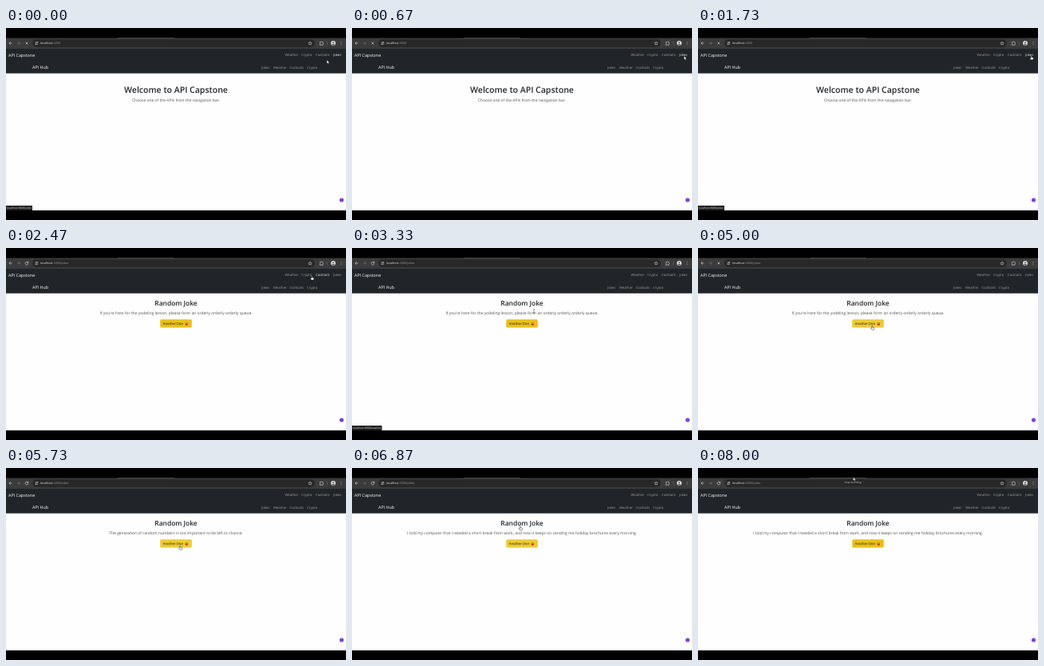
An HTML page that plays this animation: 426x240 px, repeating every 8070 ms.

```html
<!DOCTYPE html>
<html lang="en">
<head>
<meta charset="utf-8">
<title>API Capstone</title>
<style>
  html, body { margin: 0; width: 100%; height: 100%; overflow: hidden; background: #000; }
  svg { display: block; width: 100vw; height: 100vh; }
  text { font-family: "Open Sans", "Noto Sans", sans-serif; text-rendering: geometricPrecision; white-space: pre; }
  .brand { font-size: 5.37px; fill: #fff; }
  .link { font-size: 4.25px; fill: #9b9d9f; }
  .mid { text-anchor: middle; fill: #212529; }
  .lead { font-size: 4.95px; fill: #4c5054; }
  .title { font-weight: 600; }
  .icon { fill: none; stroke: #d5d5d5; stroke-width: .65; }
</style>
</head>
<body>
<svg viewBox="0 0 426 240" preserveAspectRatio="none">
  <rect width="426" height="240"/>
  <rect y="12.5" width="426" height="13.5" fill="#3b3b3b"/>
  <path d="M140 12.5H210.5" stroke="#666" stroke-width=".5"/>
  <rect x="33" y="14.3" width="354" height="9.6" rx="4.8" fill="#282828"/>

  <!-- toolbar -->
  <g class="icon">
    <path d="M7.5 19H4M5.6 17.3L3.9 19L5.6 20.7"/>
    <path d="M14 19H17.5M15.9 17.3L17.6 19L15.9 20.7" stroke="#777"/>
    <path id="stop" d="M24.6 17.6L27.4 20.4M27.4 17.6L24.6 20.4"/>
    <path id="reload" d="M27.7 18.2A1.9 1.9 0 1 0 27.9 19.5M27.9 16.8V18.5H26.2"/>
    <path d="M36.5 18H38.4M39 20.2H40.2M36.5 20.2H37.4M39.6 18H40.2"/>
    <circle cx="39" cy="18" r=".6"/><circle cx="37.8" cy="20.2" r=".6"/>
    <path d="M381 16.9L381.6 18.4L383.2 18.5L382 19.5L382.4 21L381 20.2L379.6 21L380 19.5L378.8 18.5L380.4 18.4Z" stroke-width=".5"/>
    <path d="M393.3 17.5H394.6A.8.8 0 0 1 396.1 17.5H397V18.6A.8.8 0 0 1 397 20.1V21.2H393.3V20A.8.8 0 0 0 393.3 18.6Z"/>
    <path d="M402.5 16.8V21.2" stroke="#666"/>
  </g>
  <circle cx="410" cy="19" r="2.9" fill="#e4e4e4"/>
  <circle cx="410" cy="18.2" r="1" fill="#555"/>
  <path d="M408 20.9Q410 18.7 412 20.9Q410 22.2 408 20.9" fill="#555"/>
  <g fill="#d5d5d5"><circle cx="420" cy="17.3" r=".45"/><circle cx="420" cy="19" r=".45"/><circle cx="420" cy="20.7" r=".45"/></g>
  <text x="43" y="20.3" font-size="3.72" fill="#e6e6e6">localhost<tspan id="path" fill="#9a9a9a"></tspan></text>

  <!-- page -->
  <rect y="26" width="426" height="31" fill="#212529"/>
  <rect y="56.7" width="426" height="171.3" fill="#fefefe"/>
  <text class="brand" x="3" y="35.7">API Capstone</text>
  <text class="brand" x="33" y="51.2">API Hub</text>
  <g id="links"></g>

  <g id="home">
    <text class="mid title" x="213" y="81" font-size="10.54">Welcome to API Capstone</text>
    <text class="mid lead" x="213" y="92">Choose one of the APIs from the navigation bar.</text>
  </g>
  <g id="jokes">
    <text class="mid title" x="213" y="72.3" font-size="8.43">Random Joke</text>
    <text class="mid lead" id="joke" x="213" y="82.6"></text>
    <rect id="button" x="193.2" y="89.2" width="39.6" height="10.4" rx="1.5"/>
    <text x="196.8" y="96" font-size="4.17" fill="#111">Another One</text>
    <circle cx="226.2" cy="94.7" r="2.2" fill="#f2b322"/>
    <path d="M224.6 94.7H227.9Q227.8 96.7 226.2 96.7Q224.7 96.7 224.6 94.7" fill="#c8202c"/>
    <path d="M224.7 93.8L225.8 94.1M226.7 94.1L227.8 93.8" stroke="#5a2512" stroke-width=".6"/>
  </g>

  <circle cx="420.5" cy="215" r="2.6" fill="#7d43d3"/>
  <g id="status">
    <rect id="statusBox" y="222" height="6" fill="#1f1f1f"/>
    <text id="statusText" x="1" y="226.1" font-size="3.25" fill="#e8e8e8"></text>
  </g>
  <g id="tooltip">
    <rect x="180" y="13.8" width="27.6" height="8.8" rx=".8" fill="#252525" stroke="#444" stroke-width=".3"/>
    <text x="193.8" y="19.3" font-size="3.2" fill="#d8d8d8" text-anchor="middle">Stop recording</text>
  </g>

  <g id="cursor" stroke-linejoin="round">
    <path id="arrow" d="M0 0V4.6L1.1 3.6L1.9 5.3L2.7 4.9L1.9 3.3H3.3Z" fill="#fff" stroke="#111" stroke-width=".4"/>
    <path id="hand" d="M-.5 .4Q0-.3 .5 .4V2.1L2.3 2.5Q2.8 2.7 2.6 3.5L2.1 5.2H-.5L-1.8 3.4Q-1.8 2.6-.5 3.1Z" fill="#fff" stroke="#111" stroke-width=".45"/>
    <path id="beam" d="M-.9-2.3H.9M0-2.3V2.3M-.9 2.3H.9" fill="none" stroke="#333" stroke-width=".5"/>
  </g>
</svg>
<script>
const LOOP = 8070;
const $ = id => document.getElementById(id);
const show = (id, on) => $(id).style.display = on ? '' : 'none';

const rows = [
  [35.3, { Weather: 349.5, Crypto: 370, Cocktails: 388, Jokes: 410 }],
  [50.8, { Jokes: 320, Weather: 335, Cocktails: 355.5, Crypto: 377 }]
];
$('links').innerHTML = rows.map(([y, items]) => Object.entries(items).map(([name, x]) =>
  `<text class="link" x="${x}" y="${y}">${name}</text>`).join('')).join('');
const topLinks = [...$('links').children].slice(0, 4);

const jokes = [
  [0, "If you're here for the yodeling lesson, please form an orderly orderly orderly queue."],
  [5130, 'The generation of random numbers is too important to be left to chance.'],
  [6470, 'I told my computer that I needed a short break from work, and now it keeps on sending me holiday brochures every morning.']
];
const statuses = [[0, 'jokes'], [400, ''], [700, 'jokes'], [2130, ''], [2730, 'weather'],
  [3530, ''], [3870, 'jokes'], [4930, '']];
const hovers = [[0, 'Jokes'], [2300, 'Cocktails'], [2480, 'Crypto'], [2660, 'Weather'], [2900, '']];
const loading = [[0, true], [1930, false], [4730, true], [5130, false], [5930, true], [6400, false]];
const buttonFill = [[0, '#eac018'], [3730, '#edcb35'], [6930, '#eac018']];

// time, x, y, pointer shape
const moves = [
  [0, 402, 40, 'arrow'], [150, 402, 40, 'arrow'], [800, 417.6, 34.5, 'hand'],
  [2100, 417.6, 34.5, 'hand'], [2780, 357, 35, 'hand'], [2930, 340, 45, 'arrow'],
  [3300, 228, 79, 'beam'], [3400, 228, 79, 'beam'], [3730, 218.3, 97, 'hand'],
  [6530, 218.3, 97, 'hand'], [6870, 210.7, 72.5, 'hand'], [6935, 209, 67, 'arrow'],
  [7600, 194.5, 11.5, 'arrow'], [LOOP, 194.5, 11.5, 'arrow']
];

const lastBefore = (steps, t) => steps.findLast(step => step[0] <= t);
const valueAt = (steps, t) => lastBefore(steps, t)[1];

function drawCursor(t) {
  const from = lastBefore(moves, t);
  const to = moves[moves.indexOf(from) + 1];
  const p = (t - from[0]) / (to[0] - from[0]);
  const ease = p * p * (3 - 2 * p);
  const at = i => from[i] + (to[i] - from[i]) * ease;
  $('cursor').setAttribute('transform', `translate(${at(1)} ${at(2)})`);
  for (const shape of ['arrow', 'hand', 'beam']) show(shape, shape === from[3]);
}

function draw(now) {
  const t = now % LOOP;
  const onJokes = t >= 1930;
  show('home', !onJokes);
  show('jokes', onJokes);
  $('path').textContent = onJokes ? ':3000/jokes' : ':3000';
  $('joke').textContent = valueAt(jokes, t);
  $('button').setAttribute('fill', valueAt(buttonFill, t));

  show('stop', valueAt(loading, t));
  show('reload', !valueAt(loading, t));
  const hovered = valueAt(hovers, t);
  for (const link of topLinks) link.style.fill = link.textContent === hovered ? '#e8e9e9' : '';

  const status = valueAt(statuses, t);
  show('status', status);
  $('statusText').textContent = 'localhost:3000/' + status;
  $('statusBox').setAttribute('width', status === 'weather' ? 37.5 : 33);
  show('tooltip', t >= 7730);
  drawCursor(t);
}

const start = performance.now();
(function frame() {
  draw(performance.now() - start);
  requestAnimationFrame(frame);
})();
</script>
</body>
</html>
```
